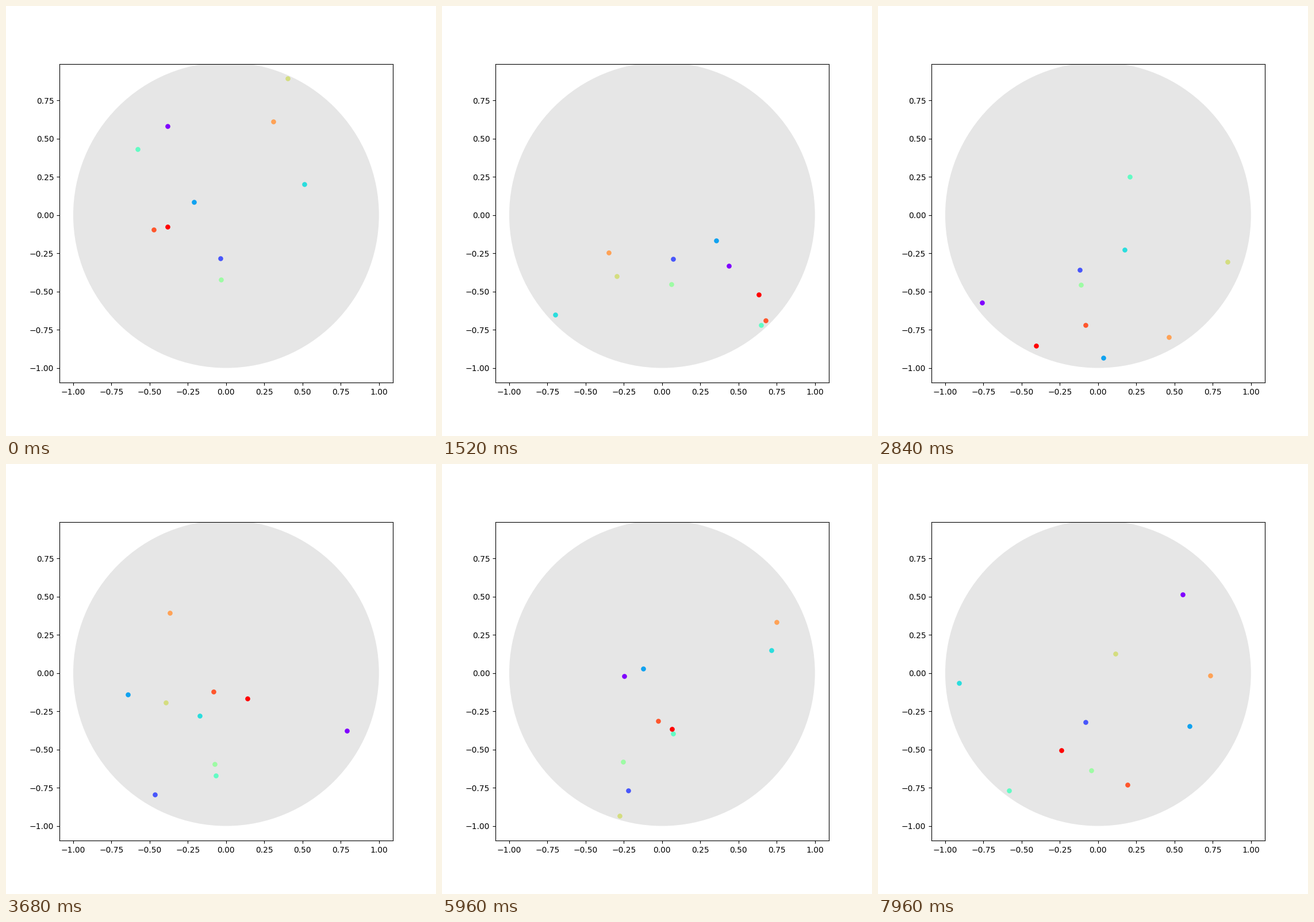
These frames come from a looping animation (748x748 px, 8000 ms). A matplotlib script:

```python
import numpy as np
import matplotlib.pyplot as plt
from matplotlib.animation import FuncAnimation
from matplotlib.patches import Circle

FRAMES, INTERVAL = 200, 40
BALLS = 10
G, DT, SUBSTEPS = 10.0, 0.0005, 40
STAGE = 748


def step(pos, vel):
    """One Euler step under gravity, then an elastic bounce off the wall."""
    pos = pos + vel * DT
    vel = vel - 1j * G * DT
    dist = np.abs(pos)
    normal = pos / dist
    speed_out = (vel * normal.conj()).real
    bounce = (dist > 1) & (speed_out > 0)
    return pos, vel - 2 * np.where(bounce, speed_out, 0) * normal


def make_paths():
    """Positions x + iy of all balls in each frame, dropped from rest."""
    rng = np.random.RandomState(123)
    radius = rng.rand(BALLS)
    angle = 2 * np.pi * rng.rand(BALLS)
    pos = radius * np.exp(1j * angle)
    vel = np.zeros(BALLS, complex)
    paths = [pos]
    for _ in range(FRAMES - 1):
        for _ in range(SUBSTEPS):
            pos, vel = step(pos, vel)
        paths.append(pos)
    return paths


paths = make_paths()

fig, ax = plt.subplots(figsize=(STAGE / 100, STAGE / 100), dpi=100)
fig.subplots_adjust(left=93 / STAGE, right=672.7 / STAGE)
ax.set_aspect("equal")
ax.set_xlim(-1.09, 1.09)
ax.set_ylim(-1.0947, 0.989)
ax.add_patch(Circle((0, 0), 1, facecolor="0.9", linewidth=0))
colors = plt.cm.rainbow(np.linspace(0, 1, BALLS))
dots = [ax.plot([], [], "o", color=c, markersize=6.2, markeredgewidth=0)[0]
        for c in colors]


def update(i):
    for dot, z in zip(dots, paths[i]):
        dot.set_data([z.real], [z.imag])
    return dots


anim = FuncAnimation(fig, update, frames=FRAMES, init_func=lambda: update(0),
                     interval=INTERVAL, repeat=True, repeat_delay=0)
plt.show()
```
